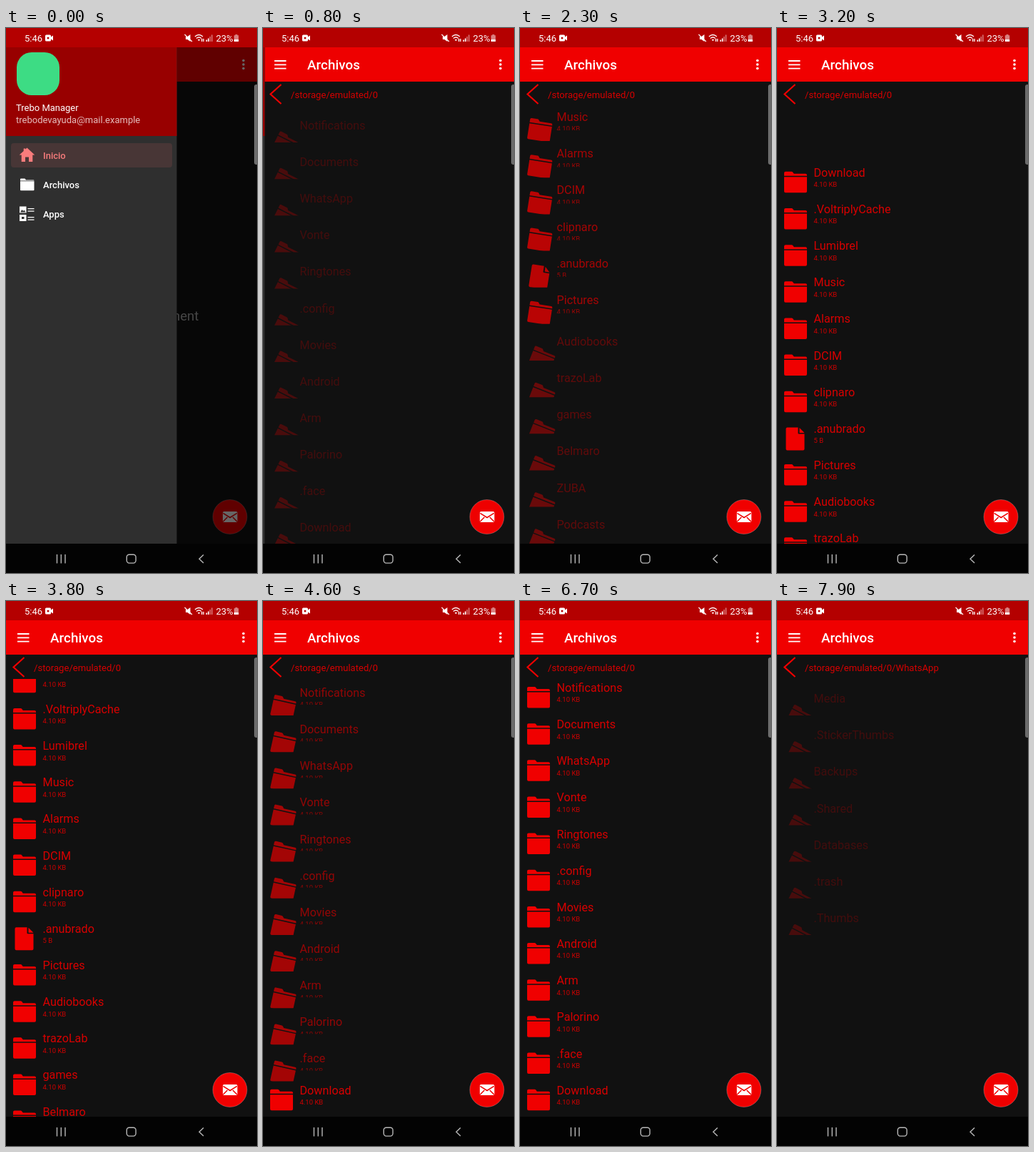
Write an HTML page that moves like this. It is 352 by 762 pixels and loops after 8 s.

```html
<!DOCTYPE html>
<html lang="es">
<head>
<meta charset="utf-8">
<title>Archivos</title>
<style>
html, body { margin: 0; width: 100%; height: 100%; overflow: hidden; background: #000; }
svg { display: block; width: 100vw; height: 100vh; font-family: Roboto, sans-serif; font-size: 13px; }
.med { font-weight: 500; }
.name { font-size: 16.2px; fill: #d60000; }
.size { font-size: 9.5px; fill: #cc0000; }
.line { fill: none; stroke: currentColor; }
</style>
</head>
<body>
<svg viewBox="0 0 352 762">
  <defs>
    <clipPath id="listClip"><rect y="109" width="352" height="612"/></clipPath>
    <clipPath id="textClip"><rect y="-4" width="352" height="40"/></clipPath>
    <clipPath id="iconClip"><rect y="-4" width="60" height="55"/></clipPath>
    <clipPath id="itemClip"><rect x="7" y="202" width="226" height="34" rx="4"/></clipPath>
    <path id="folder" d="M-16-8.5v-4q0-2 2-2h8.5q1 0 1.7.9l1.6 2.1H14q2 0 2 2v1zM-16-7h32v20q0 2-2 2h-28q-2 0-2-2z"/>
    <path id="file" d="M-11.5-15H3.5V-7q0 1 1 1h8V15q0 2-2 2h-22q-2 0-2-2V-13q0-2 2-2zM5.5-14.5l7 7h-7z"/>
  </defs>

  <rect width="352" height="762" fill="#111"/>

  <!-- app page -->
  <rect y="27" width="352" height="48" fill="#f00000"/>
  <path class="line" color="#fff" stroke-width="1.8" d="M16 46h16.500M16 51.300h16.500M16 56.600h16.500"/>
  <text id="title" class="med" x="62" y="58" font-size="18.900" fill="#fff">Inicio</text>
  <g fill="#fff">
    <circle cx="333" cy="45.500" r="1.800"/><circle cx="333" cy="51" r="1.800"/><circle cx="333" cy="56.500" r="1.800"/>
  </g>
  <text id="home" x="176" y="409" text-anchor="middle" font-size="18.500" fill="#b0b0b0">This is home Fragment</text>
  <g id="files">
    <path class="line" color="#f00000" stroke-width="2.200" d="M25.500 79L10.500 92.500L25.500 106"/>
    <text id="path" x="39" y="97.500" font-size="13.100" fill="#d60000"></text>
    <g id="list" clip-path="url(#listClip)"></g>
  </g>
  <circle cx="314" cy="683.500" r="24" fill="#f00000" stroke="#fff" stroke-opacity=".3" stroke-width=".8"/>
  <rect x="304" y="676" width="20.500" height="15" rx="1.800" fill="#fff"/>
  <path class="line" color="#f00000" stroke-width="1.500" d="M304.500 678.300l9.700 6.200l9.700-6.200M304.500 690l6-6M324 690l-6-6"/>

  <!-- drawer -->
  <rect id="scrim" y="27" width="352" height="694"/>
  <g id="drawer">
    <rect y="27" width="239.500" height="694" fill="#2f2f2f"/>
    <rect y="27" width="239.500" height="124" fill="#980000"/>
    <rect x="15" y="34" width="60" height="60" rx="21" fill="#3ddc84"/>
    <text x="14" y="115.500" fill="#fff">Trebo Manager</text>
    <text x="14" y="133" fill="#e5bcbc">trebodevayuda@mail.example</text>
    <rect id="mark" x="7" y="161" width="226" height="34" rx="4" fill="#483636"/>
    <g clip-path="url(#itemClip)"><circle id="ripple" cx="110" cy="219" fill="#fff" fill-opacity=".09"/></g>
    <g class="item">
      <path d="M29.500 167.500l10.800 10h-3v9.500h-5.300v-6.500h-5v6.500h-5.300v-9.500h-3l6-5.600v-3.400h2.500v1z"/>
      <text class="med" x="52" y="183">Inicio</text>
    </g>
    <g class="item">
      <path d="M20 213.500v-2q0-1 1-1h5.500l1.500 2h10.500q1 0 1 1zM20 214.300h19.500v12q0 1-1 1h-17.500q-1 0-1-1z"/>
      <text class="med" x="52" y="224">Archivos</text>
    </g>
    <g class="item">
      <path d="M19 249.500h9.500v9h-9.500zM19 261h9.500v9h-9.500zM30.500 252h9v1.300h-9zM30.500 255.500h9v1.300h-9zM30.500 264h9v1.300h-9zM30.500 267.500h9v1.300h-9z"/>
      <path fill="#2f2f2f" d="M20 257.500l2.500-3.500l1.700 2l1.300-1.500l2 3zM22 264h3.500v3h-3.500z"/>
      <text class="med" x="52" y="265">Apps</text>
    </g>
  </g>

  <!-- system bars -->
  <rect width="352" height="27" fill="#b40000"/>
  <g fill="#fff" color="#fff">
    <text x="26" y="18.800">5:46</text>
    <path d="M56.500 9.500h5q1.500 0 1.500 1.500v1.500l3-2v7l-3-2v1.500q0 1.500-1.500 1.500h-5q-1.500 0-1.500-1.500v-6q0-1.500 1.500-1.500z"/>
    <circle cx="59" cy="14" r="1.500" fill="#b40000"/>
    <path d="M252 12h2.500l4-3v10l-4-3h-2.500z"/>
    <path class="line" stroke-width="1.200" d="M250.500 9l10.500 10"/>
    <path class="line" stroke-width="1.300" d="M265 12q5.500-5 11 0M267 14.500q3.500-3 7 0"/>
    <path d="M268.800 16.300q1.700-1.300 3.400 0l-1.700 2zM274 15h1.300v4h-1.300zM276.300 15h1.300v4h-1.300z"/>
    <path d="M280.500 16.500h1.600v2.500h-1.600zM283 14.500h1.600v4.500h-1.600z"/>
    <path fill-opacity=".45" d="M285.500 12h1.600v7h-1.600zM288 9.500h1.600v9.500h-1.600z"/>
    <text x="294.500" y="18.800">23%</text>
    <path fill-opacity=".5" d="M321.500 9h3v1.200h1.700v6h-6.400v-6h1.700z"/>
    <path d="M319.800 16h6.400v3h-6.400z"/>
  </g>
  <rect x="348" y="79" width="8" height="112" rx="3" fill="#6c6c6c"/>
  <rect y="721" width="352" height="41" fill="#030303"/>
  <g class="line" color="#b8b8b8" stroke-width="1.400">
    <path d="M71.500 736v12.500M77.300 736v12.500M83 736v12.500"/>
    <rect x="169.300" y="736.300" width="12.800" height="11.800" rx="3.500"/>
    <path d="M277 736.500l-6 5.700l6 5.700"/>
  </g>
</svg>

<script>
const $ = id => document.getElementById(id);
const ROW = 51.15, TOP = 109, MAX = 718;
const NAV = 560, OPEN = 7570;
const root = ['Notifications', 'Documents', 'WhatsApp', 'Vonte', 'Ringtones', '.config', 'Movies',
  'Android', 'Arm', 'Palorino', '.face', 'Download', '.VoltriplyCache', 'Lumibrel', 'Music', 'Alarms',
  'DCIM', 'clipnaro', '.anubrado', 'Pictures', 'Audiobooks', 'trazoLab', 'games', 'Belmaro', 'ZUBA', 'Podcasts'];
const sub = ['Media', '.StickerThumbs', 'Backups', '.Shared', 'Databases', '.trash', '.Thumbs'];
const scrollKeys = [[1500, 0], [1600, 243], [1650, 400], [1880, MAX], [2950, MAX], [3200, 481.6],
  [3400, 520], [3700, 600], [3950, 560], [4010, 200], [4100, 0]];

const clamp = v => Math.max(0, Math.min(1, v));
const smooth = v => (1 - Math.cos(Math.PI * clamp(v))) / 2;

function makeRow(name) {
  const g = document.createElementNS('http://www.w3.org/2000/svg', 'g');
  const isFile = name === '.anubrado';
  g.innerHTML = `<g clip-path="url(#iconClip)"><use href="#${isFile ? 'file' : 'folder'}" fill="#f00000"/></g>
    <g clip-path="url(#textClip)"><g><text class="name" x="51.500" y="18">${name}</text>
    <text class="size" x="51.500" y="32.400">${isFile ? '5 B' : '4.10 KB'}</text></g></g>`;
  $('list').append(g);
  return { g, icon: g.querySelector('use'), text: g.children[1].firstChild };
}
const rootRows = root.map(makeRow), subRows = sub.map(makeRow);
const items = document.querySelectorAll('.item');

function scrollAt(t) {
  const n = scrollKeys.findIndex(k => k[0] > t);
  if (n < 1) return 0;
  const [a, b] = [scrollKeys[n - 1], scrollKeys[n]];
  return a[1] + (b[1] - a[1]) * (t - a[0]) / (b[0] - a[0]);
}

// Time at which a row starts to fade in
function startOf(i, t) {
  if (i < 11) return t < 2900 ? 460 : 4002;
  return i < 12 ? 460 : i < 14 ? 1590 : i < 20 ? 1633 : 1864;
}

function placeRow(row, y, age) {
  const p = smooth(age / 1000), q = 1 - p;
  const shown = p > 0 && y > 50 && y < 725;
  row.g.style.display = shown ? '' : 'none';
  if (!shown) return;
  row.g.setAttribute('transform', `translate(0 ${y})`);
  row.g.setAttribute('opacity', p);
  row.icon.setAttribute('transform', `translate(${26 + 8 * q} ${25.5 + 40 * q}) rotate(${36 * q})`);
  row.text.setAttribute('transform', `translate(0 ${20 * q})`);
}

function draw(t) {
  const gone = t >= NAV, inSub = t >= OPEN, scroll = scrollAt(t);
  $('title').textContent = gone ? 'Archivos' : 'Inicio';
  $('home').style.display = gone ? 'none' : '';
  $('files').style.display = gone ? '' : 'none';
  $('path').textContent = '/storage/emulated/0' + (inSub ? '/WhatsApp' : '');
  rootRows.forEach((r, i) => placeRow(r, TOP + i * ROW - scroll, inSub ? 0 : t - startOf(i, t)));
  subRows.forEach((r, i) => placeRow(r, TOP + i * ROW, t - OPEN));

  const k = 1 - (1 - clamp((t - 570) / 300)) ** 3;
  $('drawer').setAttribute('transform', `translate(${-240 * k} 0)`);
  $('scrim').setAttribute('opacity', 0.6 * (1 - k));
  $('mark').setAttribute('y', gone ? 202 : 161);
  $('ripple').setAttribute('r', t < 60 || gone ? 0 : 20 + 115 * clamp((t - 60) / 240));
  items.forEach((el, i) => el.setAttribute('fill', i === (gone ? 1 : 0) ? '#f87c7c' : '#fff'));
}

const begin = performance.now();
function tick() {
  draw((performance.now() - begin) % 8000);
  requestAnimationFrame(tick);
}
tick();
</script>
</body>
</html>
```
